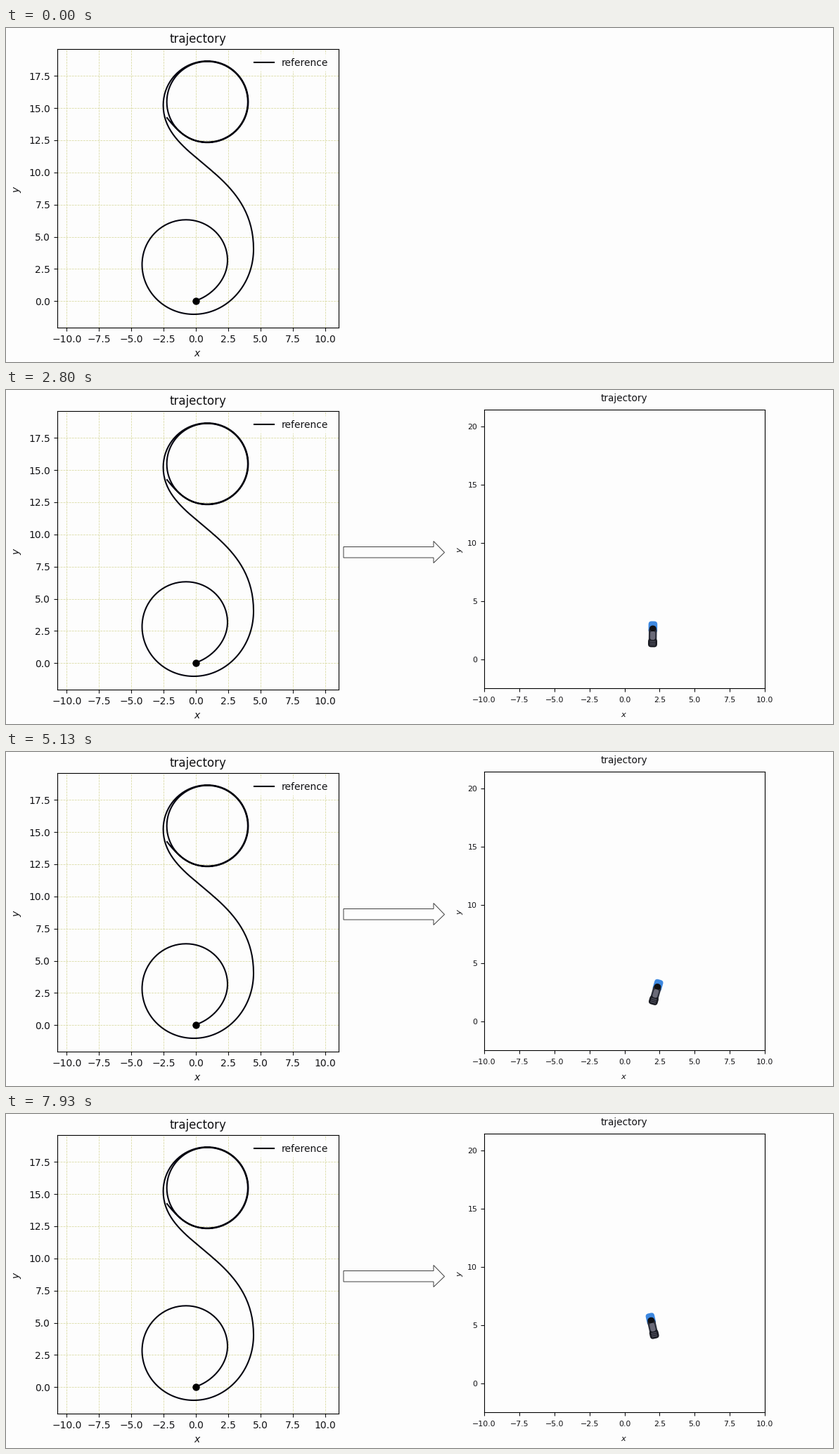
Animation, 1176 px wide and 476 px high, one loop 8 s. Source, as a matplotlib script:

```python
import numpy as np
import matplotlib.pyplot as plt
from matplotlib.animation import FuncAnimation
from matplotlib.patches import Ellipse, FancyBboxPatch, Polygon
from matplotlib.transforms import Affine2D

W, H, DPI = 1176, 476, 100
FRAMES, STEP = 160, 50
APPEAR = 2500
PAPER, INK = "#fdfdfd", "#111114"

plt.rcParams.update({"font.family": "DejaVu Sans", "text.color": INK,
                     "xtick.labelcolor": INK, "ytick.labelcolor": INK})


def pt(px):
    return px * 72 / DPI


fig = plt.figure(figsize=(W / DPI, H / DPI), dpi=DPI, facecolor=PAPER)
stage = fig.add_axes([0, 0, 1, 1], zorder=5)
stage.set(xlim=(0, W), ylim=(H, 0))
stage.axis("off")
px = stage.transData


def panel(left, top, right, bottom, xlim, ylim, yticks, size, pad):
    ax = fig.add_axes([left / W, 1 - bottom / H, (right - left) / W, (bottom - top) / H],
                      facecolor=PAPER)
    ax.set(xlim=xlim, ylim=ylim, xticks=np.arange(-10, 10.1, 2.5), yticks=yticks)
    ax.tick_params(labelsize=pt(size), color=INK)
    ax.tick_params(axis="x", pad=pad)
    return ax


def label(ax, x, y, text, size, rotation=0):
    ax.text(x, y, text, fontsize=pt(size), rotation=rotation, transform=px,
            ha="center", va="center")


# Reference path: quarter turns between extreme points, joined by Bezier curves
def bezier(*ctrl):
    t = np.linspace(0, 1, 40)[:, None]
    a, b, c, d = np.array(ctrl, float)
    return (1 - t)**3 * a + 3 * t * (1 - t)**2 * b + 3 * t**2 * (1 - t) * c + t**3 * d


def quarters(points, upright):
    """Quarter ellipses through the points; upright if the first leaves vertically."""
    arcs = []
    for (x0, y0), (x1, y1) in zip(points, points[1:]):
        kx, ky = 0.5523 * (x1 - x0), 0.5523 * (y1 - y0)
        if upright:
            arcs.append(bezier((x0, y0), (x0, y0 + ky), (x1 - kx, y1), (x1, y1)))
        else:
            arcs.append(bezier((x0, y0), (x0 + kx, y0), (x1, y1 - ky), (x1, y1)))
        upright = not upright
    return arcs


X0, Y0, UX, UY = 270, 389.2, 18.36, 18.34
start, end = (X0, 388.5), (229, 128)
spiral = [(315, 331), (256, 273.3), (193.5, 337), (267, 408), (352, 315)]
lap = np.arange(7)
radius = 58.2 - 0.15 * lap
ring = np.c_[286.4 - radius * np.sin(lap * np.pi / 2),
             105.3 - radius * np.cos(lap * np.pi / 2)]
ring[:, 0] = 2 * 286.4 - ring[:, 0]
entry = (223.6, 110)
curve = np.vstack(
    [bezier(start, (293, 381), (315, 358), spiral[0])] + quarters(spiral, True)
    + [bezier(spiral[-1], (352, 201), (223.6, 189), entry)]
    + quarters([entry, *ring], True)
    + [bezier(ring[-1], (263, 163), (246, 150), end)])

ref = panel(73, 30, 473, 426.8,
            ((73 - X0) / UX, (473 - X0) / UX), ((Y0 - 426.8) / UY, (Y0 - 30) / UY),
            np.arange(0, 17.6, 2.5), 13.9, 3.5)
ref.grid(ls="--", lw=0.55, color="#d7d89c")
ref.plot((curve[:, 0] - X0) / UX, (Y0 - curve[:, 1]) / UY, color="#050510", lw=1.5,
         label="reference")
ref.plot(0, 0, "o", color="black", ms=pt(9))
ref.legend(loc="upper right", bbox_to_anchor=(0.994, 1), fontsize=10,
           facecolor=PAPER, edgecolor="none")
label(ref, 273, 16, "trajectory", 16.67)
label(ref, 272, 464, "$x$", 13.9)
label(ref, 16, 230, "$y$", 13.9, 90)

world = panel(680, 28, 1079, 425, (-10, 10), (-2.5, 21.45), np.arange(0, 21, 5), 11, 5)
label(world, 879, 12, "trajectory", 13.6)
label(world, 879, 463, "$x$", 11.5)
label(world, 646, 227, "$y$", 11.5, 90)

stage.add_patch(Polygon([(480, 223.5), (608, 223.5), (608, 215.5), (623.5, 231.5),
                         (608, 246.5), (608, 239), (480, 239)],
                        fc=PAPER, ec="#3c3c3c", lw=0.7))


# Car seen from above, nose towards negative y
def block(top, w, h, color):
    r = min(w, h) * 0.35
    return FancyBboxPatch((r - w / 2, top + r), w - 2 * r, h - 2 * r, fc=color,
                          ec="none", boxstyle=f"round,pad={r}")


car = [block(-18.5, 12.6, 17, "#3d88e0"),
       block(-9, 11.5, 22, "#2b2e3a"),
       Ellipse((0, -8.2), 9.8, 8.5, fc="#101014", ec="none"),
       block(6, 13, 12.5, "#1a1b22"),
       block(-4, 7, 12, "#6a6a78")]
car += [block(y, 8, 1.4, "#50505e") for y in (9.5, 12, 14.5)]
for part in car:
    stage.add_patch(part)

# Resting poses: time, x, y, heading in degrees clockwise from up
poses = np.array([(2500, 919, 350, 0), (4100, 925.8, 331, 9),
                  (6500, 922, 360, 27), (8000, 919, 301.5, -13)])


def pose_at(t):
    i = np.clip(np.searchsorted(poses[:, 0], t, side="right") - 1, 0, len(poses) - 2)
    a, b = poses[i], poses[i + 1]
    s = np.clip((t - a[0]) / (b[0] - a[0]), 0, 1)
    return (a + (b - a) * s * s * (3 - 2 * s))[1:]


def draw(i):
    t = i * STEP
    world.set_visible(t >= APPEAR)
    stage.set_visible(t >= APPEAR)
    x, y, turn = pose_at(t + 20)
    place = Affine2D().rotate_deg(turn).translate(x, y) + px
    for part in car:
        part.set_transform(place)
    return car


anim = FuncAnimation(fig, draw, frames=FRAMES, interval=STEP, repeat=True,
                     repeat_delay=0, blit=False)
plt.show()
```
